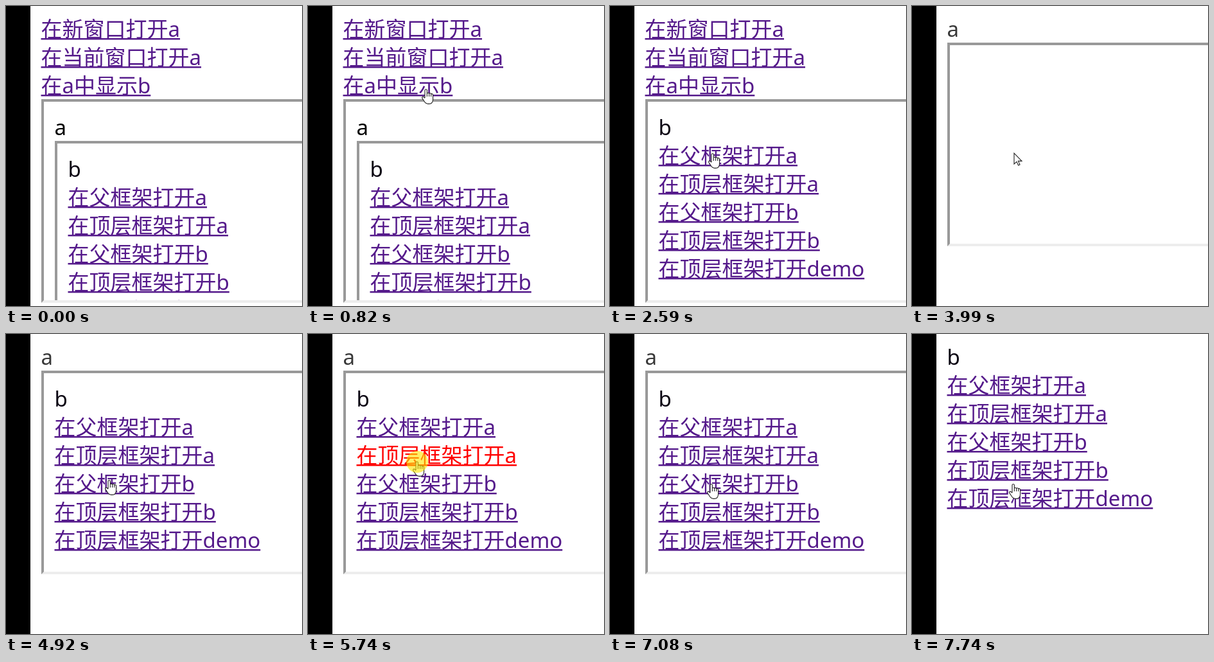
Recreate the animation shown at these times as an HTML page with a canvas. Size 461 px wide and 467 px high, loop 8000 ms.

```html
<!DOCTYPE html>
<html lang="zh-CN">
<head>
<meta charset="utf-8">
<style>
html, body { margin: 0; height: 100%; overflow: hidden; background: #fff; }
canvas { display: block; }
</style>
</head>
<body>
<canvas id="stage" width="461" height="467"></canvas>
<script>
const W = 461, H = 467, LOOP = 8000, STEP = 70, LINE = 44;
const ctx = document.getElementById('stage').getContext('2d');
const FONT = '33px "Noto Sans", "Noto Sans CJK SC", "Noto Sans CJK", sans-serif';

const homeLinks = ['在新窗口打开a', '在当前窗口打开a', '在a中显示b'];
const bLinks = ['在父框架打开a', '在顶层框架打开a', '在父框架打开b', '在顶层框架打开b', '在顶层框架打开demo'];

// Pointer hotspot moves: start time, steps, from, to
const moves = [
  [260, 9, [436, 388], [183, 129]],
  [1890, 1, [183, 129], [182, 129]],
  [2090, 8, [182, 129], [159, 229]],
  [4920, 7, [159, 229], [169, 198]],
  [6800, 5, [169, 198], [157, 233]]
];
// Mouse presses: down, link turns red, up
const presses = [[1300, 1360, 1420], [3780, 3850, 3920], [5670, 5740, 5870], [7540, 7610, 7740]];

const hand = new Path2D('M5 14V2.2C5 .2 8.4 .2 8.4 2.2V7C9 5.8 11.3 6 11.6 7.4C12.3 6.3 14.4 6.7 14.7 8' +
  'C15.6 7.2 17.6 7.7 17.6 9.4V16C17.6 20.5 15.5 23.4 11.5 23.4H10C7 23.4 5.3 21.5 4 19.3' +
  'L.9 14.6C0 13 1.8 11.3 3.3 12.6L5 14.4M8.4 7V12M11.6 7.4V12M14.7 8V12');
const arrow = new Path2D('M0 0V17L4 13.3L6.6 19L9 18L6.5 12.4H12Z');

let pointer, overLink, linkDown;

function pointerAt(t) {
  const move = moves.filter(m => t >= m[0]).pop();
  if (!move) return null;
  const [start, steps, from, to] = move;
  const p = Math.min(1, (Math.floor((t - start) / STEP) + 1) / steps);
  const e = p * p * (3 - 2 * p);
  return from.map((v, i) => Math.round(v + (to[i] - v) * e));
}

function text(str, x, y, color = '#000') {
  ctx.fillStyle = color;
  ctx.fillText(str, x, y);
}

function link(str, x, y) {
  const width = ctx.measureText(str).width;
  const over = pointer && pointer[0] >= x && pointer[0] < x + width &&
    pointer[1] >= y - 35 && pointer[1] < y + 9;
  if (over) overLink = true;
  text(str, x, y, over && linkDown ? '#f00' : '#551a8b');
  ctx.fillRect(x, y + 2, width, 2.5);
}

function links(list, x, y) {
  list.forEach((str, i) => link(str, x, y + i * LINE));
}

function pageB(x, y, withLinks = true) {
  text('b', x, y, '#0a0512');
  if (withLinks) links(bLinks, x, y + LINE);
}

// Inset frame border with its content clipped inside
function frame(x, top, bottom, content) {
  ctx.fillStyle = '#999';
  ctx.fillRect(x, top, W, 4);
  ctx.fillRect(x, top, 4, bottom - top);
  ctx.fillStyle = '#ededed';
  ctx.beginPath();
  ctx.moveTo(x, bottom);
  ctx.lineTo(x + 4, bottom - 4);
  ctx.lineTo(W, bottom - 4);
  ctx.lineTo(W, bottom);
  ctx.fill();
  ctx.save();
  ctx.beginPath();
  ctx.rect(x + 4, top + 4, W, bottom - top - 8);
  ctx.clip();
  content();
  ctx.restore();
}

function home(content) {
  links(homeLinks, 54.5, 48);
  frame(55, 145, 462, content);
}

function pageA(content) {
  text('a', 54.5, 48, '#383838');
  frame(55, 57, 374, content);
}

function nested() {
  text('a', 75.5, 201);
  frame(76, 210, 527, () => pageB(96.5, 266));
}

function page(t) {
  if (t < 1420) home(nested);
  else if (t < 3990) home(() => pageB(75.5, 201, t >= 1490));
  else if (t < 7740) pageA(() => {
    const blank = t < 4060 || (t >= 5940 && t < 6000);
    if (!blank) pageB(75.5, 113, t < 5940 || t >= 6070);
  });
  else pageB(54.5, 48);
}

function drawPointer(pressed) {
  const [x, y] = pointer;
  const shape = overLink ? hand : arrow;
  ctx.save();
  ctx.translate(overLink ? x - 6 : x, y);
  ctx.fillStyle = '#fff';
  ctx.strokeStyle = '#222';
  ctx.lineWidth = 1.1;
  ctx.fill(shape);
  ctx.stroke(shape);
  ctx.restore();
  if (pressed) {
    ctx.fillStyle = 'rgba(255, 228, 0, .6)';
    ctx.beginPath();
    ctx.arc(x + 1, y + 1, 17, 0, 7);
    ctx.fill();
  }
}

function draw(now) {
  const t = now % LOOP;
  const press = presses.find(([down, , up]) => t >= down && t < up);
  pointer = pointerAt(t);
  overLink = false;
  linkDown = press && t >= press[1];
  ctx.font = FONT;
  ctx.fillStyle = '#fff';
  ctx.fillRect(0, 0, W, H);
  ctx.fillStyle = '#000';
  ctx.fillRect(0, 0, 38, H);
  page(t);
  if (pointer) drawPointer(press);
  requestAnimationFrame(draw);
}
requestAnimationFrame(draw);
</script>
</body>
</html>
```
